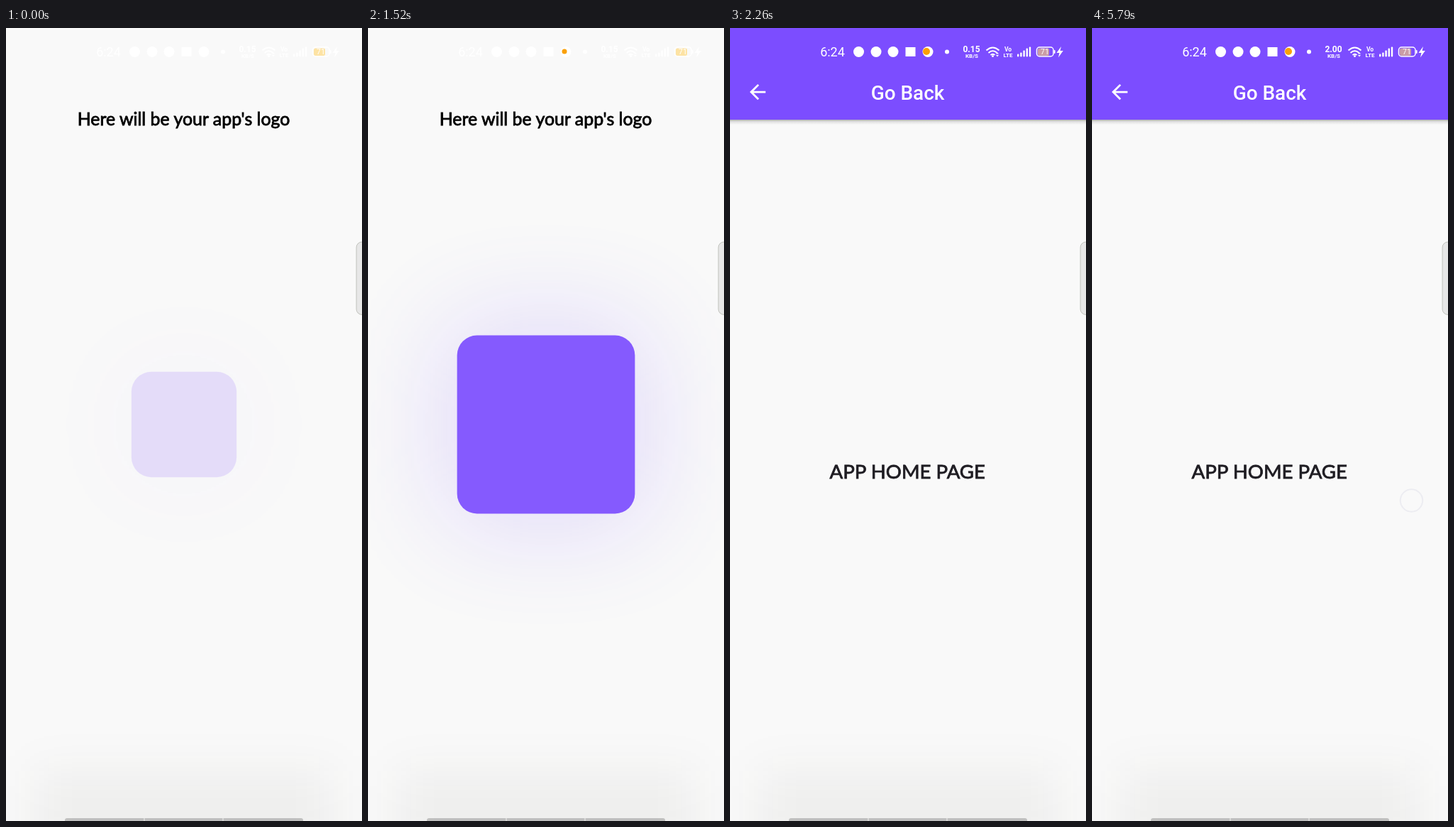
Animation, 502 px wide and 1116 px high, one loop 5840 ms. Source, as an HTML page:

```html
<!DOCTYPE html>
<html lang="en">
<head>
<meta charset="utf-8">
<title>Splash screen</title>
<style>
  html, body { margin: 0; width: 100%; height: 100%; overflow: hidden; background: #f9f9f9; }
  svg { display: block; width: 100vw; height: 100vh; }
  text { text-anchor: middle; }
  .lato { font-family: Lato, sans-serif; stroke-width: .8; }
  .title { font: 500 27.9px Roboto, sans-serif; }
  .status { font-family: Roboto, sans-serif; fill: #fff; }
  .bold { font-weight: 700; }
</style>
</head>
<body>
<svg viewBox="0 0 502 1116" xmlns="http://www.w3.org/2000/svg">
  <defs>
    <filter id="glowBlur" filterUnits="userSpaceOnUse" x="-300" y="0" width="1102" height="1116" color-interpolation-filters="sRGB">
      <feGaussianBlur stdDeviation="80"/>
    </filter>
    <filter id="footBlur" filterUnits="userSpaceOnUse" x="-100" y="900" width="702" height="400" color-interpolation-filters="sRGB">
      <feGaussianBlur stdDeviation="32"/>
    </filter>
    <linearGradient id="barShade" x2="0" y2="1">
      <stop stop-opacity=".3"/>
      <stop offset=".4" stop-opacity=".1"/>
      <stop offset="1" stop-opacity="0"/>
    </linearGradient>
  </defs>

  <rect width="502" height="1116" fill="#f9f9f9"/>
  <text class="lato" x="250.5" y="137" font-size="24.9" fill="#000" stroke="#000">Here will be your app's logo</text>

  <g id="logo" fill="#7c4dff">
    <rect id="glow" rx="28" fill-opacity=".22" filter="url(#glowBlur)"/>
    <rect id="box" rx="28"/>
    <circle id="disc" cx="251" cy="558"/>
  </g>

  <g id="home">
    <rect width="502" height="1116" fill="#f9f9f9"/>
    <rect y="129" width="502" height="7" fill="url(#barShade)"/>
    <rect width="502" height="129" fill="#7c4dff"/>
    <path transform="translate(22.3 73.3) scale(1.394)" fill="#fff" d="M20 11H7.83l5.59-5.59L12 4l-8 8 8 8 1.41-1.41L7.83 13H20z"/>
    <text class="title" x="250.5" y="101" fill="#fff">Go Back</text>
    <text class="lato" x="250.3" y="634" font-size="27.6" fill="#1e1c22" stroke="#1e1c22">APP HOME PAGE</text>
  </g>

  <circle id="touch" cx="450.5" cy="665" r="15.7" fill="none" stroke="#e9eaf0" stroke-width="2"/>

  <!-- system overlays -->
  <rect x="40" y="1046" width="422" height="120" fill="#30341c" fill-opacity=".05" filter="url(#footBlur)"/>
  <path d="M86 1112H194.5V1116H83V1115Q83 1112 86 1112M195.5 1112H305.5V1116H195.5zM306.5 1112H416Q419 1112 419 1115V1116H306.5z" fill-opacity=".2"/>
  <rect x="494" y="301" width="20" height="102.5" rx="8" fill="#cfd0d0" fill-opacity=".44" stroke="#59604e" stroke-opacity=".3"/>

  <g class="status">
    <text x="144.5" y="40" font-size="18">6:24</text>
    <circle cx="181.5" cy="33.5" r="7.5"/>
    <circle cx="206" cy="33.5" r="7.5"/>
    <circle cx="230" cy="33.5" r="7.5"/>
    <rect x="247.5" y="27" width="14" height="13"/>
    <circle cx="279" cy="33.5" r="7.5"/>
    <circle cx="306" cy="33.5" r="3"/>
    <text class="bold" id="speed" x="340.5" y="34" font-size="12">0.15</text>
    <text class="bold" x="341" y="41.5" font-size="8">KB/S</text>
    <path fill="none" stroke="#fff" stroke-width="2" d="M361.5 31.5Q370.5 23.5 379.5 31.5M364.5 35Q370.5 29.5 376.5 35M367.5 38Q370.5 35.5 373.5 38"/>
    <circle cx="370.5" cy="39.5" r="1.5"/>
    <path d="M375 36.5l2-2.5 2 2.5zM375 38l2 2.5 2-2.5z"/>
    <text class="bold" x="392" y="32.5" font-size="8.500">Vo</text>
    <text class="bold" x="392" y="41" font-size="8">LTE</text>
    <g id="bars"></g>
    <rect x="434" y="28.5" width="16" height="10.5" rx="2.5" fill="#ffd46a" fill-opacity=".6"/>
    <rect x="432.5" y="27" width="23.5" height="13" rx="4" fill="none" stroke="#fff" stroke-width="1.5"/>
    <rect x="456.8" y="31" width="1.8" height="5" rx=".9"/>
    <text x="444" y="37.3" font-size="10.5">71</text>
    <path d="M467 26l-6.5 9h4l-1.500 6.500 6.800-9.500h-4.300z"/>
    <circle id="rec" cx="277" cy="33" fill="#faa006"/>
  </g>
</svg>
<script>
const LOOP = 5840;
const $ = id => document.getElementById(id);
const set = (id, attrs) => { for (const k in attrs) $(id).setAttribute(k, attrs[k]); };
const ramp = (t, start, length) => Math.min(1, Math.max(0, (t - start) / length));

// Cubic bezier (.18, 1, .04, 1): quick start, long settle.
function settle(x) {
  let lo = 0, hi = 1;
  for (let i = 0; i < 24; i++) {
    const s = (lo + hi) / 2, r = 1 - s;
    if (.54 * r * r * s + .12 * r * s * s + s * s * s < x) lo = s; else hi = s;
  }
  return 1 - (1 - lo) ** 3;
}

function square(id, size) {
  set(id, { x: 251 - size / 2, y: 558 - size / 2, width: size, height: size });
}

$('bars').innerHTML = [4, 6, 9, 12, 14].map((h, i) =>
  `<rect x="${405 + i * 4.2}" y="${40.5 - h}" width="2.4" height="${h}" rx="1"/>`).join('');

function draw(t) {
  const age = t < 640 ? 143 + t * .79 : t + 9;
  const size = 69.7 + 181.2 * settle(ramp(age, 0, 2000));
  square('box', size);
  square('glow', size + 28);
  set('disc', { r: 836 * ramp(t, 1543.5, 340) });
  set('logo', { opacity: settle(ramp(age, -25, 6000)) });
  set('home', { opacity: ramp(t, 1899, 300) });
  set('rec', { r: 3.5 * ramp(t, 1080, 150) + 1.5 * ramp(t, 1900, 300) });
  set('touch', { opacity: ramp(t, 5400, 500) });
  $('speed').textContent = t < 3630 ? '0.15' : '2.00';
}

const begin = performance.now();
function tick() {
  draw((performance.now() - begin) % LOOP);
  requestAnimationFrame(tick);
}
draw(0);
requestAnimationFrame(tick);
</script>
</body>
</html>
```
